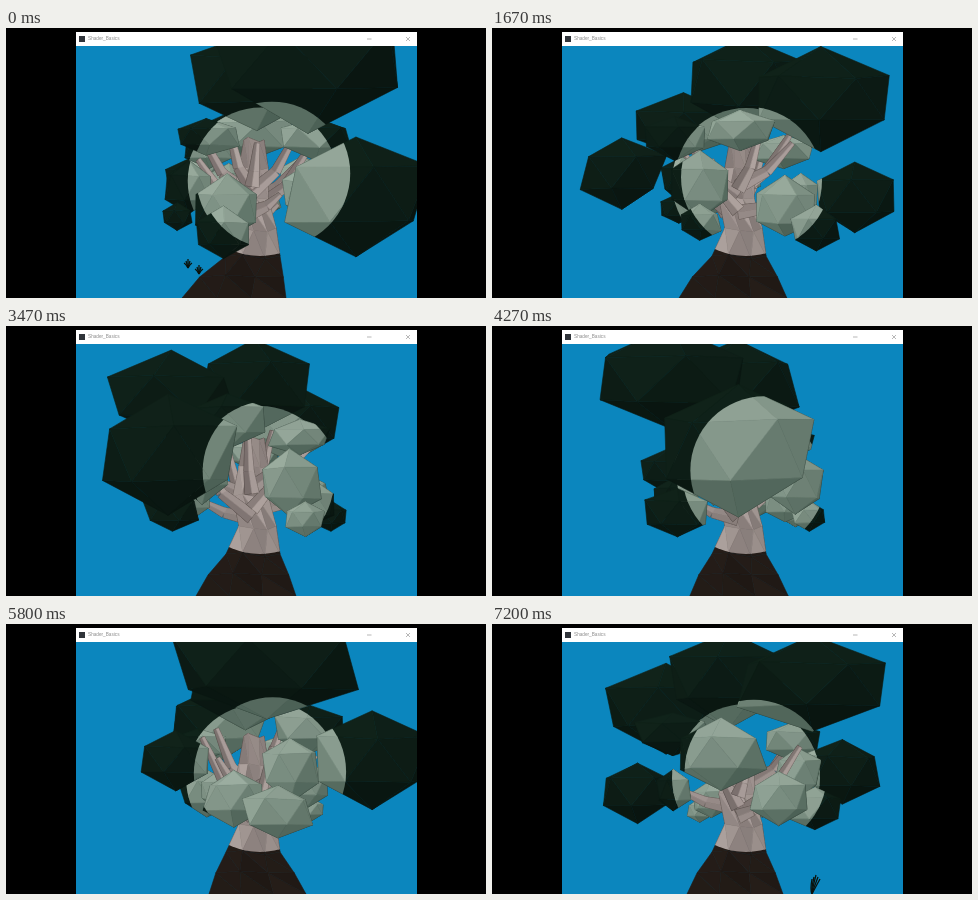
Recreate the animation shown at these times as an HTML page with a canvas. Size 480 by 270 pixels, loop 7.27 s.

```html
<!DOCTYPE html>
<html lang="en">
<head>
<meta charset="utf-8">
<title>Shader_Basics</title>
<style>
html, body { margin: 0; width: 100%; height: 100%; overflow: hidden; background: #000; }
canvas { position: absolute; left: 0; top: 0; }
#title { position: absolute; left: 82px; top: 7px; font: 4.7px/8px "Liberation Sans", Arial, sans-serif; color: #8a8a8a; white-space: nowrap; }
</style>
</head>
<body>
<canvas id="stage" width="480" height="270"></canvas>
<div id="title">Shader_Basics</div>
<script>
const ctx = document.getElementById('stage').getContext('2d');
const LOOP = 7270, STEP = 200 / 3, LAST = 108;
const SPIN = .55, DIST = 216, AXIS = 245, HORIZON = 170;

// Leaf clumps around the trunk: bearing, distance, height, half width, half height
const clumps = [
  [.5, 80, 76, 64, 41],
  [-3.05, 75, 84, 57, 33],
  [.8, 8, 54, 60, 43],
  [-2.34, 108, 147, 38, 30],
  [.55, 112, 168, 40, 31],
  [-2.2, 60, 114, 28, 18],
  [-1.4, 60, 160, 22, 22],
  [-.28, 62, 178, 23, 21],
  [-.2, 85, 192, 17, 14],
  [-2.95, 75, 182, 23, 17],
  [-1.3, 70, 187, 14, 11],
  [-2.65, 58, 150, 21, 22],
  [-3.4, 60, 172, 21, 18],
  [-4.1, 75, 143, 28, 20],
  [-.87, 50, 118, 26, 14],
  [-5.1, 62, 116, 32, 17],
  [.7, 65, 166, 17, 19]
];

// Foot of the trunk shifts a little as the view goes round
const footStep = [0, 13, 36, 52, 75, 87, 108];
const footLeft = [176, 186, 188, 190, 205, 203, 195];
const footRight = [280, 285, 304, 290, 302, 300, 291];
// Trunk above the foot: height, left, right
const stem = [[228, 220, 274], [200, 233, 270], [170, 227, 262], [140, 233, 262], [112, 238, 258]];

const LEAF = { lit: [[76, 97, 86], [160, 178, 164]], dark: [[9, 21, 16], [17, 36, 27]] };
const BARK = { lit: [[102, 92, 90], [180, 168, 164]], dark: [[27, 21, 18], [38, 30, 25]] };

const lerp = (a, b, u) => a + (b - a) * u;
const hash = n => { const s = Math.sin(n * 127.1 + 11.7) * 43758.5453; return s - Math.floor(s); };
const tone = (a, b, u) => `rgb(${a.map((v, i) => Math.round(lerp(v, b[i], u)))})`;

function fillShape(pts, color) {
  ctx.beginPath();
  pts.forEach(p => ctx.lineTo(p[0], p[1]));
  ctx.closePath();
  ctx.fillStyle = ctx.strokeStyle = color;
  ctx.fill();
  ctx.stroke();
}

// Paints facets unlit, then again inside the light cone, which shifts on near surfaces
function paint({ facets, mat, z }) {
  const near = Math.max(z, 0);
  const draw = range => facets.forEach(f => fillShape(f.pts, tone(range[0], range[1], f.shade)));
  draw(mat.dark);
  ctx.save();
  ctx.beginPath();
  ctx.arc(254 + 17 * near, 154 - 9 * near, 74, 0, 7);
  ctx.clip();
  draw(mat.lit);
  ctx.restore();
}

// Icosahedron: two poles and two rings of five
const solid = [[0, -1, 0]];
for (let i = 0; i < 10; i++) {
  const a = i * Math.PI / 5, y = i % 2 ? .447 : -.447;
  solid.push([.894 * Math.sin(a), y, .894 * Math.cos(a)]);
}
solid.push([0, 1, 0]);
const faces = [];
for (let i = 0; i < 10; i++) {
  const a = 1 + i, b = 1 + (i + 1) % 10, c = 1 + (i + 2) % 10;
  faces.push([a, b, c], [i % 2 ? 11 : 0, a, c]);
}

function clump([bearing, dist, height, w, h], id, time) {
  const turn = bearing + SPIN * time;
  const z = dist * Math.cos(turn), scale = DIST / (DIST - z);
  const cx = AXIS + dist * Math.sin(turn) * scale;
  const cy = HORIZON + (height - HORIZON) * scale;
  const spin = turn + id * 1.7, cos = Math.cos(spin), sin = Math.sin(spin);
  const v = solid.map((p, i) => {
    const r = (1 + .24 * hash(id * 13 + i)) * scale;
    return [cx + (p[0] * cos + p[2] * sin) * w * r, cy + p[1] * h * r, (p[2] * cos - p[0] * sin) * w * r];
  });
  const facets = [];
  faces.forEach((f, i) => {
    const pts = f.map(j => v[j]), [a, b, c] = pts;
    const e = b.map((n, j) => n - a[j]), g = c.map((n, j) => n - a[j]);
    let n = [e[1] * g[2] - e[2] * g[1], e[2] * g[0] - e[0] * g[2], e[0] * g[1] - e[1] * g[0]];
    const out = n[0] * (a[0] - cx) + n[1] * (a[1] - cy) + n[2] * a[2];
    const len = Math.hypot(...n) * Math.sign(out);
    n = n.map(q => q / len);
    if (n[2] <= 0) return;
    const shade = .38 - .22 * n[0] - .42 * n[1] + .2 * n[2] + .16 * (hash(id * 31 + i) - .5);
    facets.push({ pts, shade: Math.min(1, Math.max(0, shade)), depth: a[2] + b[2] + c[2] });
  });
  facets.sort((a, b) => a.depth - b.depth);
  return { z: z / 100, facets, mat: LEAF };
}

function trunk(n) {
  let k = 0;
  while (k < 5 && n >= footStep[k + 1]) k++;
  const u = (n - footStep[k]) / (footStep[k + 1] - footStep[k]);
  const left = lerp(footLeft[k], footLeft[k + 1], u), right = lerp(footRight[k], footRight[k + 1], u);
  const rows = [[270, left, right], [249, lerp(left, 220, .4), lerp(right, 274, .45)], ...stem];
  const at = (r, c) => {
    const wob = c % 3 && r ? (hash(r * 4 + c) - .5) * 8 : 0;
    return [lerp(rows[r][1], rows[r][2], c / 3) + wob, rows[r][0] + wob];
  };
  const facets = [];
  for (let r = 0; r < rows.length - 1; r++) for (let c = 0; c < 3; c++) {
    const a = at(r, c), b = at(r, c + 1), d = at(r + 1, c), e = at(r + 1, c + 1), s = r * 7 + c * 2;
    facets.push({ pts: [a, b, d], shade: .3 + .6 * hash(s) }, { pts: [b, e, d], shade: .3 + .6 * hash(s + 1) });
  }
  return { z: 0, facets, mat: BARK };
}

function branch(i, time) {
  const turn = i * 2.4 + time * SPIN, z = .35 * Math.cos(turn);
  const reach = (48 + 20 * hash(i)) * Math.sin(turn);
  const y0 = 155 + 38 * hash(i + 20), y2 = 92 + 85 * hash(i + 40);
  const base = [246, y0], mid = [248 + reach * .55, lerp(y0, y2, .35)], tip = [251 + reach, y2];
  const facets = [];
  [[base, mid, 7, 5], [mid, tip, 5, 2.5]].forEach(([a, b, wa, wb], j) => {
    const len = Math.hypot(b[0] - a[0], b[1] - a[1]) || 1;
    const nx = (a[1] - b[1]) / len, ny = (b[0] - a[0]) / len;
    [-1, 1].forEach(s => facets.push({
      pts: [a, b, [b[0] + nx * wb * s, b[1] + ny * wb * s], [a[0] + nx * wa * s, a[1] + ny * wa * s]],
      shade: .2 + .3 * (s * nx + 1) + .2 * hash(i * 5 + j)
    }));
  });
  return { z, facets, mat: BARK };
}

function tuft(x, y, lean, size) {
  ctx.strokeStyle = '#0b130d';
  ctx.lineWidth = 1.3;
  for (let i = -2; i <= 2; i++) {
    ctx.beginPath();
    ctx.moveTo(x, y + 4);
    ctx.quadraticCurveTo(x + i, y, x + i * 2 + lean, y - size + Math.abs(i) * 2);
    ctx.stroke();
  }
}

function grass(n) {
  if (n < 24) {
    const u = n / 13;
    tuft(182 - 30 * u, 236 + 17 * u, 0, 5);
    tuft(193 - 21 * u, 242 + 14 * u, 0, 5);
    if (n > 5) tuft(lerp(186, 169, u), lerp(231, 241, u), 0, 3);
  } else if (n > 98) {
    const u = (LAST - n) / 10;
    tuft(320 + 30 * u, 266 + 24 * u, 4, 15);
  }
}

function titleBar() {
  ctx.fillStyle = '#fff';
  ctx.fillRect(70, 4, 341, 14);
  ctx.fillStyle = '#30343a';
  ctx.fillRect(73, 8, 6, 6);
  ctx.strokeStyle = '#999';
  ctx.lineWidth = .7;
  ctx.beginPath();
  ctx.moveTo(361, 11); ctx.lineTo(365.5, 11);
  ctx.moveTo(400, 9); ctx.lineTo(404, 13);
  ctx.moveTo(404, 9); ctx.lineTo(400, 13);
  ctx.stroke();
}

function render(n) {
  const time = n * STEP / 1000;
  ctx.fillStyle = '#000';
  ctx.fillRect(0, 0, 480, 270);
  ctx.save();
  ctx.beginPath();
  ctx.rect(70, 18, 341, 252);
  ctx.clip();
  ctx.fillStyle = '#0b86be';
  ctx.fillRect(70, 18, 341, 252);
  grass(n);
  ctx.lineWidth = .6;
  ctx.lineJoin = 'round';
  const parts = [trunk(n), ...clumps.map((c, i) => clump(c, i + 1, time))];
  for (let i = 0; i < 10; i++) parts.push(branch(i, time));
  parts.sort((a, b) => a.z - b.z).forEach(paint);
  ctx.restore();
  titleBar();
}

const start = performance.now();
function tick() {
  const t = (performance.now() - start) % LOOP;
  render(Math.min(LAST, Math.floor((t + 1) / STEP)));
  requestAnimationFrame(tick);
}
tick();
</script>
</body>
</html>
```
